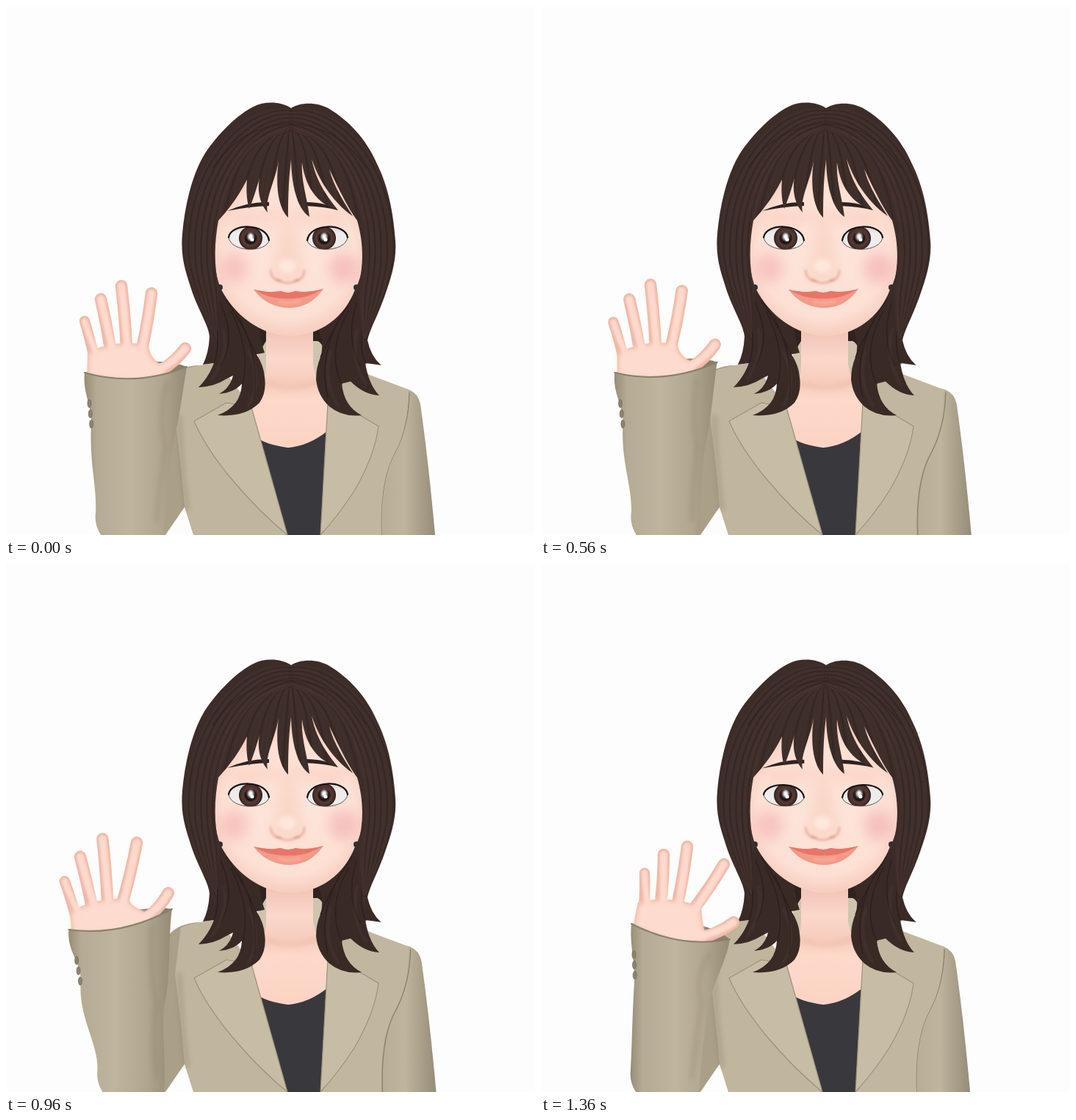
Animation of 720x720 px, one loop 1.44 s. Source, as an HTML page:

```html
<!DOCTYPE html>
<html lang="en">
<head>
<meta charset="utf-8">
<title>Waving avatar</title>
<style>
html, body { margin: 0; width: 100%; height: 100%; overflow: hidden; background: #fdfdfd; }
svg { display: block; width: 100vw; height: 100vh; }
path { stroke-linejoin: round; }
.line { fill: none; stroke-linecap: round; }
</style>
</head>
<body>
<svg viewBox="0 0 720 720">
<defs>
  <filter id="b1" filterUnits="userSpaceOnUse" x="0" y="0" width="720" height="720"><feGaussianBlur stdDeviation="1.4"/></filter>
  <filter id="b3" filterUnits="userSpaceOnUse" x="0" y="0" width="720" height="720"><feGaussianBlur stdDeviation="3"/></filter>
  <filter id="b9" filterUnits="userSpaceOnUse" x="0" y="0" width="720" height="720"><feGaussianBlur stdDeviation="9"/></filter>
  <radialGradient id="skin" gradientUnits="userSpaceOnUse" cx="385" cy="335" r="118">
    <stop offset="0" stop-color="#fee6db"/><stop offset=".75" stop-color="#fde0d4"/><stop offset="1" stop-color="#f5cabb"/>
  </radialGradient>
  <linearGradient id="neck" gradientUnits="userSpaceOnUse" x1="0" y1="440" x2="0" y2="600">
    <stop offset="0" stop-color="#f0c3b3"/><stop offset=".25" stop-color="#fbd8ca"/><stop offset=".45" stop-color="#f6ccbc"/><stop offset=".6" stop-color="#fdd9ca"/><stop offset="1" stop-color="#fcd3c3"/>
  </linearGradient>
  <linearGradient id="cloth">
    <stop offset="0" stop-color="#968d78"/><stop offset=".12" stop-color="#b5ab94"/><stop offset=".45" stop-color="#bfb59e"/><stop offset=".75" stop-color="#b1a68e"/><stop offset="1" stop-color="#958b75"/>
  </linearGradient>
  <linearGradient id="clothRight">
    <stop offset="0" stop-color="#b6ab94"/><stop offset=".5" stop-color="#bfb49d"/><stop offset="1" stop-color="#968c78"/>
  </linearGradient>
  <radialGradient id="iris">
    <stop offset="0" stop-color="#120c0c"/><stop offset=".45" stop-color="#1d1413"/><stop offset=".6" stop-color="#573a34"/><stop offset=".85" stop-color="#49302c"/><stop offset="1" stop-color="#271b1a"/>
  </radialGradient>
  <clipPath id="capClip"><use href="#cap"/></clipPath>
  <clipPath id="eyeClip0"><path id="hole0"/></clipPath>
  <clipPath id="eyeClip1"><path id="hole1"/></clipPath>
</defs>

<!-- back hair and collar -->
<path fill="#30231f" d="M290 320H480L488 460 430 478 350 474 282 466Z"/>
<path fill="#cfc5ae" d="M343 474 354 456 424 456Q433 460 436 480L428 520H345Z"/>

<!-- neck and top -->
<path fill="url(#neck)" d="M354 425H418V488Q422 512 440 536L438 600H340L330 545Q354 520 354 488Z"/>
<path class="line" stroke="#e6b09d" stroke-width="5" opacity=".5" filter="url(#b3)" d="M356 514Q390 526 422 512"/>
<path fill="#39383c" d="M340 586Q352 597 384 601Q412 599 438 578V720H378Z"/>

<!-- jacket -->
<g id="rightSleeve">
  <path fill="url(#clothRight)" d="M500 510 548 522Q561 527 564 542Q575 620 584 720H505Z"/>
  <path class="line" stroke="#898069" stroke-width="1.3" d="M549 526Q548 572 530 607Q508 645 511 720"/>
</g>
<path fill="#aaa088" d="M262 489Q225 491 213 520L185 720H217L243 682 250 590Z"/>
<path fill="#c0b59d" d="M285 486Q255 489 238 496L230 560Q238 620 243 682L255 720H383L334 546 300 500Z"/>
<path fill="#c1b69f" d="M438 538 424 505 484 498 548 522Q548 572 530 607Q508 645 511 720H428Z"/>
<g fill="#c7bda5" stroke="#9c927b" stroke-width="1.2">
  <path d="M334 546 300 540 256 565Q272 602 308 645Q344 688 383 720Z"/>
  <path d="M438 540 470 550 507 572Q502 612 474 660Q452 694 428 720Z"/>
</g>
<path class="line" stroke="#837963" stroke-width="7" opacity=".3" filter="url(#b3)" d="M236 560Q238 620 246 684"/>

<!-- front locks -->
<path fill="#3a2a26" d="M282 340 277 450Q276 472 268 488L283 486Q276 505 262 519Q284 518 299 508L309 503Q305 520 290 528Q311 526 321 514Q320 545 288 557Q325 560 345 540Q355 526 352 505Q351 490 341 474L352 472Q346 455 345 440L300 380Z"/>
<path fill="#3a2a26" d="M488 340 492 455Q497 478 511 489L489 486Q494 516 508 530Q487 529 469 511L457 514Q460 545 484 557Q458 560 440 545Q424 530 422 508Q422 492 428 478Q434 458 424 438L470 380Z"/>
<g class="line" stroke="#231917" stroke-width="1.5" opacity=".6">
  <path d="M292 405Q314 452 292 490M306 415Q334 470 322 515M318 425Q345 480 338 532M287 440Q290 470 283 486M300 400Q326 440 340 474"/>
  <path d="M477 405Q462 452 482 490M466 415Q436 470 457 515M454 425Q425 480 438 532M486 430Q480 470 490 487M470 400Q444 440 428 478"/>
</g>
<g class="line" stroke="#57423c" stroke-width="3" opacity=".35" filter="url(#b1)">
  <path d="M330 470Q350 510 330 544M296 440Q304 475 280 508M442 470Q430 510 452 544M478 440Q468 480 490 515"/>
</g>

<!-- face -->
<path fill="url(#skin)" d="M296 200H470Q492 320 485 350Q484 370 475 386C461 424 426 449 388 449C346 449 311 420 293 386Q285 368 284 345Q282 310 296 200Z"/>
<g filter="url(#b9)">
  <ellipse cx="310" cy="357" rx="19" ry="20" fill="#f1a5a8" opacity=".5"/>
  <ellipse cx="460" cy="357" rx="20" ry="20" fill="#f1a5a8" opacity=".55"/>
  <path fill="#f2b3a2" opacity=".35" d="M300 282H470L450 298 386 292 316 298Z"/>
  <path fill="#eeae9a" opacity=".3" d="M374 300H394L406 374H362Z"/>
</g>
<g fill="#323030"><circle cx="291" cy="383" r="4"/><circle cx="477" cy="383" r="4"/></g>
<ellipse cx="383" cy="354" rx="12" ry="10" fill="#ffece2" opacity=".8" filter="url(#b3)"/>
<path class="line" stroke="#df9482" stroke-width="3" opacity=".55" filter="url(#b1)" d="M360 360Q361 371 370 373Q384 381 396 373Q406 371 406 360"/>
<path class="line" stroke="#c7705f" stroke-width="2" opacity=".5" filter="url(#b1)" d="M368 373 374 374M393 374 399 373"/>
<path fill="#f39a88" d="M337 386Q358 391 374 388Q384 392 394 388Q410 391 432 385Q414 411 385 411Q355 410 337 386Z"/>
<path fill="#e87568" d="M337 386Q358 391 374 388Q384 392 394 388Q410 391 432 385Q406 400 385 398Q360 400 337 386Z"/>
<path class="line" stroke="#f9b3a2" stroke-width="4" opacity=".6" filter="url(#b1)" d="M372 403Q386 406 400 402"/>
<path id="brows" fill="#2e2220"/>
<g id="eyes"></g>

<!-- fringe and crown -->
<path id="cap" fill="#3d2d29" d="M289 292Q314 265 328 236Q326 260 331 276Q341 252 348 222C339 250 346 270 356 281C352 262 366 240 371 211C366 250 372 276 384 288C384 270 384 240 388 209C389 250 398 277 413 287C410 262 401 235 403 213C408 250 426 270 452 278C434 256 421 235 416 208C427 240 446 268 472 286C458 264 446 245 440 222C456 255 466 276 478 292C486 320 488 350 479 385L486 470 492 455C495 440 507 420 517 390C524 370 532 345 530 320C527 280 520 245 505 215C490 180 465 155 440 140C425 131 402 130 388 139C375 130 352 129 337 137C316 147 288 174 270 202C252 232 243 275 240 310C237 345 246 365 252 385C262 415 276 435 277 450L286 470 290 385C282 350 284 320 289 292Z"/>
<g id="streaks" clip-path="url(#capClip)" class="line"></g>

<!-- waving arm -->
<path id="cuffBack" fill="#887e69"/>
<g id="hand"></g>
<path id="sleeve" fill="url(#cloth)"/>
<path id="cuffEdge" class="line" stroke="#898069" stroke-width="2"/>
<path id="fold" class="line" stroke="#877d67" stroke-width="5" opacity=".3" filter="url(#b3)"/>
<g id="buttons" fill="#8d846f" stroke="#736a57" stroke-width=".8"></g>
</svg>
<script>
const $ = id => document.getElementById(id);
const set = (node, attrs) => { for (const k in attrs) node.setAttribute(k, attrs[k]); };
const add = (parent, tag, attrs) => {
  const node = document.createElementNS('http://www.w3.org/2000/svg', tag);
  set(node, attrs);
  return parent.appendChild(node);
};
const lerp = (a, b, k) => a + (b - a) * k;

// Four fingertips, outer knuckles, thumb tip and base, cuff ends, sleeve x: left, right, elbow
const POSES = {
  left:  [107,429, 129,399, 157,381, 198,391, 119,475, 186,462, 244,466, 212,495, 107,499, 246,491, 116,228,122],
  right: [161,428, 188,405, 210,392, 241,407, 170,470, 239,470, 290,497, 253,519, 152,493, 282,526, 147,245,121],
  lean:  [186,410, 221,392, 251,393, 290,431, 164,456, 238,473, 281,506, 246,517, 146,477, 256,519, 135,230,113],
  up:    [141,424, 164,398, 189,388, 223,404, 150,470, 219,467, 273,487, 236,511, 134,499, 271,516, 134,242,119],
  tilt:  [165,419, 204,396, 236,394, 267,415, 154,466, 229,474, 275,492, 240,513, 133,489, 264,516, 135,238,132],
  back:  [141,422, 167,397, 199,386, 249,410, 140,466, 210,468, 262,489, 222,509, 123,491, 257,512, 127,230,122]
};
// One entry per 80 ms: pose, pose blended in, amount
const STEPS = [
  ['left'], ['left', 'up', .1], ['up'], ['right'], ['right', 'lean', .55], ['lean'],
  ['back'], ['left', 'up', -.25], ['up'], ['right', 'tilt', .45], ['tilt'],
  ['back', 'left', .5], ['left', 'up', -.8], ['left', 'up', .6], ['right'],
  ['right', 'lean', .6], ['lean', 'back', .5], ['back']
];
const BLINK = { 13: .7, 14: 1, 15: .75, 16: .3, 17: .06 };
const STEP = 80;

// Hair strands fanning out from the parting
for (const s of [-1, 1]) {
  for (let i = 0; i < 16; i++) {
    const dark = i % 3 === 1;
    const style = dark
      ? { stroke: '#261b19', 'stroke-width': 1.4, opacity: .45 }
      : { stroke: '#5b453e', 'stroke-width': 3, opacity: .2, filter: 'url(#b1)' };
    add($('streaks'), 'path', { ...style,
      d: `M${388 + s},${141 + i * 1.6}C${388 + s * 66},${132 + i * 3} ${388 + s * (148 - i * 2)},${220 + i * 3} ${388 + s * (142 - i * 3)},${340 + i * 3}Q${388 + s * (132 - i * 2.5)},400 ${388 + s * 100},450` });
    add($('streaks'), 'path', { ...style,
      d: `M${387 + s * i * .5},${163 + i * .4}C${388 + s * i * 4.5},${175 + i * .6} ${388 + s * i * 6},215 ${388 + s * (i * 6.6 + 6)},292` });
  }
}
add($('streaks'), 'path', { d: 'M282 220Q320 163 388 160Q452 163 490 220', stroke: '#261b19', 'stroke-width': 1.6, opacity: .45 });

const eyes = [[303, 315, 358, 319, 333], [410, 319, 465, 315, 433]].map(([x0, y0, x1, y1, cx], i) => {
  const g = add($('eyes'), 'g', { 'clip-path': `url(#eyeClip${i})` });
  add(g, 'rect', { x: x0, y: 290, width: 55, height: 50, fill: '#efecec' });
  add(g, 'circle', { cx, cy: 316, r: 16, fill: 'url(#iris)' });
  add(g, 'ellipse', { cx, cy: 314, rx: 4, ry: 5, fill: '#fff', filter: 'url(#b1)' });
  add(g, 'circle', { cx: cx + 2, cy: 318, r: 2.5, fill: '#fff' });
  add(g, 'path', { d: `M${x0} 302Q${cx} 296 ${x1} 302`, fill: 'none', stroke: '#51413e', 'stroke-width': 5, opacity: .35, filter: 'url(#b3)' });
  return { x0, y0, x1, y1, hole: $('hole' + i),
    low: add($('eyes'), 'path', { class: 'line', stroke: '#55403a', 'stroke-width': .9 }),
    lid: add($('eyes'), 'path', { class: 'line', stroke: '#171111', 'stroke-width': 2.2 }) };
});

const hand = (color, extra) => add($('hand'), 'path', { ...color, ...extra });
const finger = (stroke, width, extra) => [0, 1, 2, 3, 4].map(i =>
  hand({ class: 'line', stroke }, { 'stroke-width': i ? width : width - 2, ...extra }));
const edge = { palm: hand({ fill: '#f0b9a7' }), fingers: finger('#f0b8a6', 16.5) };
const light = {
  palm: hand({ fill: '#fddccf' }, { filter: 'url(#b3)' }),
  fingers: finger('#fddacd', 10, { filter: 'url(#b1)' })
};
const buttons = [0, 1, 2].map(() => add($('buttons'), 'ellipse', { rx: 2.4, ry: 5.5 }));

function drawArm(p) {
  const pt = i => [p[2 * i], p[2 * i + 1]];
  const [b0x, b0y] = pt(4), [b3x, b3y] = pt(5), [tx, ty] = pt(7);
  const [lx, ly] = pt(8), [rx, ry] = pt(9), [ml, mr, elbow] = p.slice(20);
  const mx = (lx + rx) / 2, my = (ly + ry) / 2;

  for (let i = 0; i < 5; i++) {
    const [x, y] = pt(i < 4 ? i : 6);
    const k = i / 3;
    const bx = i < 4 ? lerp(b0x, b3x, k) : tx;
    const by = i < 4 ? lerp(b0y, b3y, k) - 9 * Math.sin(Math.PI * k) : ty;
    const bend = i < 4 ? 1.5 : 3;
    const line = (ex, ey) => `M${x} ${y}Q${(x + bx) / 2 + bend} ${(y + by) / 2 + bend} ${ex} ${ey}`;
    set(edge.fingers[i], { d: line(bx, by) });
    set(light.fingers[i], { d: line(lerp(bx, mx, .12), lerp(by, my, .2)) });
  }
  const palm = n => `M${b0x - 8 + n} ${b0y - 4 + n}Q${(b0x + b3x) / 2} ${(b0y + b3y) / 2 - 16 + n} ${b3x + 8 - n} ${b3y + n}` +
    `Q${b3x + 10 - n} ${ty - 14} ${tx + 2 - n} ${ty - 5}L${tx + 6 - n} ${ty + 6}L${mx} ${my + 16}L${lx + 3 + n} ${ly + 4}Q${lx + 4 + n} ${ly - 8} ${b0x - 8 + n} ${b0y - 4 + n}Z`;
  set(edge.palm, { d: palm(0) });
  set(light.palm, { d: palm(2) });

  const rim = `M${lx} ${ly}Q${mx} ${my + 24} ${rx} ${ry}`;
  set($('cuffBack'), { d: `${rim}Q${lerp(mx, rx, .4)} ${my - 22} ${lx} ${ly}Z` });
  set($('cuffEdge'), { d: rim });
  set($('sleeve'), { d: `${rim}C${rx - 5} ${ry + 32} ${mr + 7} 565 ${mr} 595S219 675 215 720H${elbow + 7}` +
    `Q${elbow - 2} 706 ${elbow} 690C${elbow + 2} 655 ${ml - 3} 620 ${ml} 570C${ml + 2} 545 ${lx - 3} ${ly + 30} ${lx} ${ly}Z` });
  set($('fold'), { d: `M${rx - 28} ${ry + 22}Q${mr - 22} 560 ${mr - 12} 600Q${mr - 18} 640 205 700` });
  buttons.forEach((b, i) => set(b, { cx: lerp(lx, ml, .6 + .15 * i) + 1, cy: ly + 42 + 14 * i }));
}

function drawEyes(k) {
  for (const { x0, y0, x1, y1, hole, lid, low } of eyes) {
    const a = y0 + 4 * k, b = y1 + k;
    const inset = lerp(3, 12, k);
    const up = lerp(295, 328, k), down = lerp(336, 328, k);
    const arc = y => `M${x0} ${a}C${x0 + inset} ${y} ${x1 - inset} ${y} ${x1} ${b}`;
    set(hole, { d: `${arc(up)}C${x1 - inset} ${down} ${x0 + inset} ${down} ${x0} ${a}Z` });
    set(lid, { d: arc(up) });
    set(low, { d: arc(down) });
  }
  const brow = (ox, oy, mx, ix) => {
    const mid = lerp(266, 279, k), end = lerp(267, 279, k);
    return `M${ox} ${oy}Q${mx} ${mid} ${ix} ${end}L${ix} ${end + 5}Q${mx} ${mid + 7} ${ox} ${oy}Z`;
  };
  set($('brows'), { d: brow(lerp(301, 289, k), lerp(279, 289, k), 330, lerp(358, 362, k)) +
    brow(lerp(452, 476, k), lerp(278, 289, k), 434, 405) });
}

let shown = -1;
function draw(now) {
  const n = Math.floor(now / STEP) % STEPS.length;
  if (n === shown) return;
  shown = n;
  const [from, to = from, k = 0] = STEPS[n];
  drawArm(POSES[from].map((v, i) => lerp(v, POSES[to][i], k)));
  drawEyes(BLINK[n] || 0);
  set($('rightSleeve'), { transform: `translate(${1 - Math.cos(2 * Math.PI * n / STEPS.length)} 0)` });
}
const start = performance.now();
function tick() {
  draw(performance.now() - start);
  requestAnimationFrame(tick);
}
tick();
</script>
</body>
</html>
```
